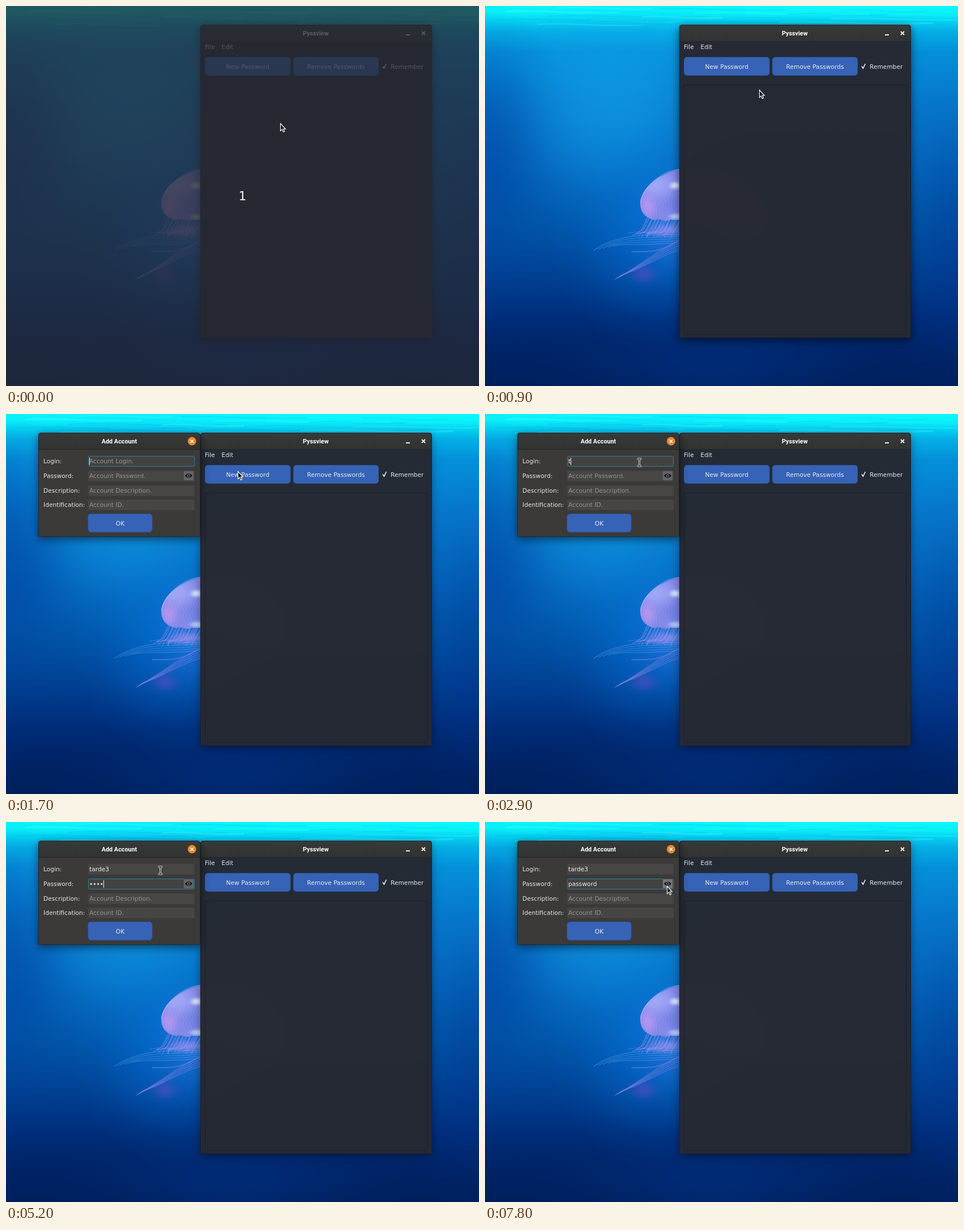
Animation of 835x671 px, one loop 8000 ms. Source, as an HTML page with a canvas:

```html
<!DOCTYPE html>
<html lang="en">
<head>
<meta charset="utf-8">
<title>Password manager demo</title>
<style>
  html, body { margin: 0; width: 100%; height: 100%; overflow: hidden; background: #002b70; }
  canvas { display: block; width: 835px; height: 671px; }
</style>
</head>
<body>
<canvas id="stage" width="835" height="671"></canvas>
<script>
const W = 835, H = 671, LOOP = 8000, STEP = 100;
const UI = '10.67px "DejaVu Sans", sans-serif';
const TITLE = 'bold 10.8px Roboto, sans-serif';
const LOGIN = 'tarde3', SECRET = 'password';
let ctx = document.getElementById('stage').getContext('2d');

function label(str, x, y, color = '#e4e4e4', align = 'left', font = UI) {
  ctx.font = font;
  ctx.textAlign = align;
  ctx.fillStyle = color;
  ctx.fillText(str, x, y);
}

function box(x, y, w, h, r, fill, line) {
  ctx.beginPath();
  ctx.roundRect(x, y, w, h, r);
  if (fill) { ctx.fillStyle = fill; ctx.fill(); }
  if (line) { ctx.strokeStyle = line; ctx.lineWidth = 1; ctx.stroke(); }
}

function polyline(points, color, width) {
  ctx.beginPath();
  points.forEach(([x, y]) => ctx.lineTo(x, y));
  ctx.strokeStyle = color;
  ctx.lineWidth = width;
  ctx.stroke();
}

function cross(x, y, r, color, width) {
  polyline([[x - r, y - r], [x + r, y + r]], color, width);
  polyline([[x - r, y + r], [x + r, y - r]], color, width);
}

// Soft elliptical light or shade
function glow(x, y, rx, ry, rgb, alpha) {
  ctx.save();
  ctx.translate(x, y);
  ctx.scale(rx, ry);
  const g = ctx.createRadialGradient(0, 0, 0, 0, 0, 1);
  for (const s of [0, .25, .5, .75, 1]) {
    g.addColorStop(s, `rgba(${rgb},${alpha * (1 + Math.cos(Math.PI * s)) / 2})`);
  }
  ctx.fillStyle = g;
  ctx.fillRect(-1, -1, 2, 2);
  ctx.restore();
}

function drawSea() {
  const g = ctx.createLinearGradient(0, 0, 0, H);
  [[0, '#0cf6fb'], [.018, '#08f2fa'], [.04, '#04d2f2'], [.065, '#04b0e6'], [.12, '#058fd9'],
   [.25, '#0679cc'], [.42, '#0468bf'], [.58, '#0156aa'], [.7, '#014295'], [.82, '#002d7a'],
   [.9, '#002468'], [1, '#001f5c']].forEach(([s, c]) => g.addColorStop(s, c));
  ctx.fillStyle = g;
  ctx.fillRect(0, 0, W, H);

  glow(225, 170, 240, 230, '20,170,240', .5);
  glow(300, 400, 190, 210, '5,120,225', .55);
  glow(0, 260, 150, 280, '0,55,150', .45);
  glow(835, 420, 140, 320, '0,50,140', .35);
  glow(400, 640, 330, 100, '0,60,150', .35);

  for (let i = 0; i < 22; i++) {
    const y = 2 + i * 1.6, x = (i * 167) % 760 - 40, len = 130 + (i * 53) % 190;
    ctx.beginPath();
    ctx.moveTo(x, y);
    ctx.bezierCurveTo(x + len * .3, y - 4, x + len * .6, y + 5, x + len, y + 1);
    ctx.lineWidth = 1 + i % 3;
    ctx.strokeStyle = i % 2 ? 'rgba(120,255,255,.2)' : 'rgba(0,170,225,.18)';
    ctx.stroke();
  }
}

function strand(x0, y0, x1, y1, x2, y2, x3, y3, color, width) {
  ctx.beginPath();
  ctx.moveTo(x0, y0);
  ctx.bezierCurveTo(x1, y1, x2, y2, x3, y3);
  ctx.strokeStyle = color;
  ctx.lineWidth = width;
  ctx.stroke();
}

function drawJelly() {
  glow(335, 385, 90, 120, '70,130,245', .35);
  glow(280, 474, 34, 24, '135,70,200', .38);
  for (let i = 0; i < 5; i++) {
    strand(345, 404 + i * 3, 300, 405 + i * 5, 240, 398 + i * 5, 191 + i * 9, 432 - i * 2,
      'rgba(95,160,240,.42)', 1.4);
    strand(345, 414 + i * 4, 300, 433 + i * 3, 285, 452 + i * 2, 229 + i * 3, 483 - i * 2,
      'rgba(135,130,232,.42)', 1.8);
  }
  strand(340, 415, 305, 438, 285, 433, 258, 434, 'rgba(130,130,230,.5)', 2);
  for (let i = 0; i < 26; i++) {
    const x = 288 + i * 2.4, sway = Math.sin(i * 2.4) * 9;
    strand(x, 372, x - 12 + sway, 392, x - 8 - sway, 398, x - 28 + sway * 1.3, 405 + sway / 2,
      i % 3 ? 'rgba(150,140,238,.5)' : 'rgba(215,165,245,.55)', 1);
  }
  glow(322, 396, 52, 16, '170,150,245', .6);

  ctx.save();
  ctx.beginPath();
  ctx.moveTo(360, 286);
  ctx.bezierCurveTo(315, 289, 274, 320, 274, 350);
  ctx.bezierCurveTo(275, 368, 288, 376, 301, 378);
  ctx.bezierCurveTo(310, 373, 318, 384, 327, 377);
  ctx.bezierCurveTo(340, 380, 360, 372, 400, 392);
  ctx.bezierCurveTo(440, 425, 492, 412, 495, 375);
  ctx.bezierCurveTo(490, 315, 425, 285, 360, 286);
  ctx.fillStyle = '#8088e8';
  ctx.fill();
  ctx.clip();
  glow(300, 315, 55, 38, '165,170,248', .9);
  glow(287, 354, 24, 32, '185,150,240', .85);
  glow(335, 350, 28, 30, '105,125,228', .7);
  glow(336, 317, 15, 10, '225,240,255', .95);
  glow(338, 372, 20, 9, '205,235,255', .75);
  for (let i = 0; i < 150; i++) {
    const a = i * 2.4, r = Math.sqrt(i / 150);
    ctx.fillStyle = 'rgba(220,205,255,.3)';
    ctx.fillRect(314 + 38 * r * Math.cos(a), 351 + 23 * r * Math.sin(a), 1.3, 1.3);
  }
  ctx.restore();
  strand(345, 288, 312, 291, 277, 320, 275, 348, 'rgba(195,190,255,.6)', 1.2);
}

function frame(x, y, w, h, fill, shadow) {
  ctx.save();
  ctx.shadowColor = `rgba(0,0,0,${shadow})`;
  ctx.shadowBlur = 16;
  ctx.shadowOffsetY = 4;
  box(x, y, w, h, [5, 5, 1, 1], fill);
  ctx.restore();
  const g = ctx.createLinearGradient(0, y, 0, y + 29);
  g.addColorStop(0, '#373a38');
  g.addColorStop(1, '#303331');
  box(x, y, w, 29, [5, 5, 0, 0], g);
  ctx.fillStyle = '#242628';
  ctx.fillRect(x, y + 29, w, 1);
  box(x + .5, y + .5, w - 1, h - 1, [5, 5, 1, 1], null, 'rgba(25,28,34,.6)');
}

function button(x, y, w, h, text) {
  box(x + .5, y + .5, w - 1, h - 1, 5, '#3763b6', '#2f58a8');
  label(text, x + w / 2, y + h / 2 + 4, '#e6eaf2', 'center');
}

function drawMain(focused) {
  frame(343, 33, 409, 553, 'rgba(39,42,51,.97)', focused ? .6 : .4);
  label('Pyssview', 546.8, 52, '#fff', 'center', TITLE);
  ctx.fillStyle = '#f2f2f2';
  ctx.fillRect(706, 50, 7, 2);
  cross(737, 48, 3, '#f2f2f2', 1.9);
  label('File', 351, 76);
  label('Edit', 380.5, 76);
  button(351, 90, 151.5, 33, 'New Password');
  button(507, 90, 151, 33, 'Remove Passwords');
  polyline([[665, 106.5], [667.5, 110], [671.3, 102]], '#e8e8e8', 1.7);
  label('Remember', 679, 110.5);
  box(351.5, 139.5, 392, 441, 0, null, '#1d2027');
}

function drawEye(hover) {
  box(313.5, 100.5, 18, 17, 2, hover ? '#75767a' : '#636468', '#46474a');
  ctx.beginPath();
  ctx.moveTo(316, 109);
  ctx.quadraticCurveTo(322.5, 101.5, 329, 109);
  ctx.quadraticCurveTo(322.5, 116.5, 316, 109);
  ctx.fillStyle = '#151515';
  ctx.fill();
  ctx.beginPath();
  ctx.arc(322.5, 109, 2.7, 0, 7);
  ctx.fillStyle = '#75767a';
  ctx.fill();
  ctx.beginPath();
  ctx.arc(322.5, 109, 1.6, 0, 7);
  ctx.fillStyle = '#151515';
  ctx.fill();
}

function field(y, name, hint, value, focused, caret) {
  label(name, 66, y + 13);
  box(145.5, y + .5, 187, 18, 2, focused ? '#424340' : '#474644', focused ? '#2f7f9f' : '#444341');
  label(value || hint, 147, y + 13, value ? '#ececec' : '#94938f');
  if (focused && caret) {
    const x = 147 + (value ? ctx.measureText(value).width : 0);
    ctx.fillStyle = '#f0f0f0';
    ctx.fillRect(Math.round(x), y + 3, 1, 13);
  }
}

const countSince = (times, t) => times.filter(s => s <= t).length;
const within = (t, a, b) => t >= a && t < b;

function drawDialog(t) {
  const letters = [0, 1, 2, 3, 5, 6][countSince([2900, 3100, 3200, 3400, 3700], t)];
  const dots = countSince([4900, 5000, 5100, 5200, 5400, 5500, 5600, 5800], t);
  const secret = t >= 7300 ? SECRET : '•'.repeat(dots);
  const caret = !(within(t, 1900, 2400) || within(t, 6600, 7200) || t >= 7800);
  const onLogin = t < 4100;

  frame(57, 33, 286, 184, 'rgba(61,59,56,.98)', .55);
  label('Add Account', 200, 52, '#fff', 'center', TITLE);
  ctx.beginPath();
  ctx.arc(328.3, 48, 7.5, 0, 7);
  ctx.fillStyle = '#ea862c';
  ctx.fill();
  cross(328.3, 48, 2.8, '#fff', 1.5);
  field(74, 'Login:', 'Account Login.', LOGIN.slice(0, letters), onLogin, caret);
  field(100, 'Password:', 'Account Password.', secret, !onLogin, caret);
  drawEye(t >= 7000);
  field(126, 'Description:', 'Account Description.', '', false);
  field(151, 'Identification:', 'Account ID.', '', false);
  button(144.5, 176, 114, 33, 'OK');
}

const pointerPath = [
  [0, 484, 207], [500, 484, 207], [1200, 484, 109], [1500, 484, 109], [2000, 272, 85],
  [6500, 272, 85], [6600, 291, 105], [6800, 298, 114], [7000, 319, 112], [7300, 319, 112],
  [7600, 321, 113], [LOOP, 321, 113]
];

function pointerAt(t) {
  const i = pointerPath.findIndex(p => p[0] > t);
  const [t0, x0, y0] = pointerPath[i - 1], [t1, x1, y1] = pointerPath[i];
  const k = (t - t0) / (t1 - t0), e = k * k * (3 - 2 * k);
  return [x0 + (x1 - x0) * e, y0 + (y1 - y0) * e];
}

function drawPointer(t) {
  const [x, y] = pointerAt(t);
  ctx.save();
  ctx.translate(Math.round(x), Math.round(y));
  if (t >= 1300 && x < 313) {
    const beam = [[[-3.5, -6], [4.5, -6]], [[.5, -6], [.5, 7]], [[-3.5, 7], [4.5, 7]]];
    beam.forEach(p => polyline(p, '#f4f4f4', 3));
    beam.forEach(p => polyline(p, '#111', 1.2));
  } else {
    ctx.beginPath();
    [[.5, .5], [.5, 13.5], [3.4, 10.9], [5.6, 15.6], [7.7, 14.6], [5.6, 10.1], [9.4, 10]]
      .forEach(([px, py]) => ctx.lineTo(px, py));
    ctx.closePath();
    ctx.fillStyle = '#161616';
    ctx.fill();
    ctx.strokeStyle = '#fff';
    ctx.lineWidth = 1.1;
    ctx.stroke();
  }
  ctx.restore();
}

const screen = ctx, backdrop = document.createElement('canvas');
backdrop.width = W;
backdrop.height = H;
ctx = backdrop.getContext('2d');
drawSea();
drawJelly();
ctx = screen;

const start = performance.now();
function render() {
  const elapsed = Math.max(0, performance.now() - start) % LOOP;
  const t = Math.floor(elapsed / STEP) * STEP;
  ctx.drawImage(backdrop, 0, 0);
  drawMain(t < 1300);
  if (t >= 1300) drawDialog(t);
  if (t < 100) {
    ctx.fillStyle = 'rgba(39,42,50,.76)';
    ctx.fillRect(0, 0, W, H);
    label('1', 417.5, 343, '#f2f2f2', 'center', '22px "DejaVu Sans", sans-serif');
  }
  drawPointer(t);
  requestAnimationFrame(render);
}
render();
</script>
</body>
</html>
```
